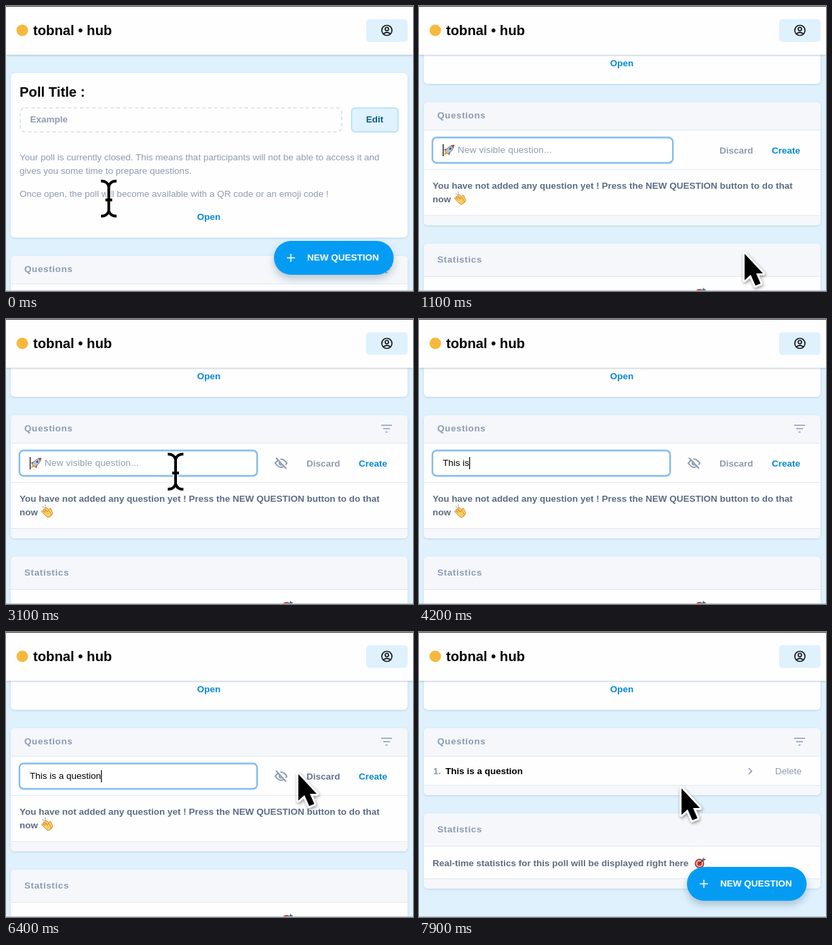
Recreate the animation shown at these times as an HTML page. Size 600x421 px, loop 8000 ms.

```html
<!DOCTYPE html>
<html lang="en">
<head>
<meta charset="utf-8">
<title>Poll editor</title>
<style>
  html, body { margin: 0; width: 100%; height: 100%; overflow: hidden; background: #dff1fd; }
  svg { display: block; width: 100%; height: 100%; }
  text { font: 13.5px "Liberation Sans", Arial, sans-serif; white-space: pre; fill: #8c9bb0; }
  .b { font-weight: bold; }
  .big { font-size: 20.25px; font-weight: bold; fill: #000; }
  .head { font-weight: bold; letter-spacing: .6px; }
  .slate { font-weight: bold; fill: #5d6c84; }
  .link { font-weight: bold; fill: #0788d1; }
  .dark { fill: #000; }
  .mid { text-anchor: middle; }
  .card { fill: #fefeff; filter: drop-shadow(0 1px 1.5px #7f9db055); }
  .band { fill: #f5f7fb; }
  .line { stroke: #e2e8f0; fill: none; }
  .icon { fill: none; stroke: #8c9bb0; stroke-width: 1.6; }
</style>
</head>
<body>
<svg viewBox="0 0 600 421">
  <defs>
    <clipPath id="qClip"><rect class="qSize" x="7" width="585" rx="6"/></clipPath>
    <clipPath id="sClip"><rect x="7" width="585" height="111" rx="6"/></clipPath>
    <path id="arrowPath" d="M0 0V39L9 31L16 47L23.500 44L17 29H27Z"/>
    <path id="beamPath" d="M-11.5-26Q-2-26 0-18Q2-26 11.5-26M0-18V18M-11.5 26Q-2 26 0 18Q2 26 11.5 26M-5 2H5"/>
  </defs>
  <rect width="600" height="421" fill="#dff1fd"/>

  <g id="page">
    <rect class="card" x="7" y="99" width="585" height="243" rx="6"/>
    <text class="big" x="20" y="134">Poll Title :</text>
    <rect x="21" y="150.5" width="474" height="35.5" rx="7" fill="none" stroke="#d8dde6" stroke-width="1.6" stroke-dasharray="5 4"/>
    <text class="b" x="35.5" y="172">Example</text>
    <rect x="509.5" y="150.5" width="68.5" height="35.5" rx="5" fill="#dff2fe" stroke="#a9ddfa" stroke-width="1.5"/>
    <text class="b mid" x="543.5" y="172" style="fill:#075985">Edit</text>
    <text x="20" y="228">Your poll is currently closed. This means that participants will not be able to access it and</text>
    <text x="20" y="248">gives you some time to prepare questions.</text>
    <text x="20" y="282">Once open, the poll will become available with a QR code or an emoji code !</text>
    <text class="link mid" x="299" y="315.5">Open</text>

    <g transform="translate(0 369)">
      <rect class="card qSize" x="7" width="585" rx="6"/>
      <g clip-path="url(#qClip)">
        <rect class="band" x="7" width="585" height="41"/>
        <path class="line" d="M7 41.5H592"/>
        <g id="foot">
          <rect class="band" x="7" width="585" height="15"/>
          <path class="line" d="M7 .5H592"/>
        </g>
      </g>
      <text class="head" x="27" y="24">Questions</text>
      <path id="filter" class="icon" d="M553 15H569M556 20H566M559.5 25H562.5"/>

      <g id="form">
        <path class="line" d="M7 99.5H592"/>
        <rect class="field" x="20" y="52.5" height="37" rx="6" fill="none" stroke="#c3e1fa" stroke-width="4"/>
        <rect class="field" x="20" y="52.5" height="37" rx="6" fill="#fff" stroke="#7db6e8" stroke-width="1.8"/>
        <g id="hint">
          <g transform="translate(44 71) rotate(45)">
            <path d="M-3-1L-6 5L-2 4ZM3-1L6 5L2 4Z" fill="#c73f37"/>
            <path d="M0-11Q5-5 3 5H-3Q-5-5 0-11Z" fill="#b9c6d2" stroke="#5d6b7a" stroke-width=".8"/>
            <path d="M0-11L2.5-7H-2.5Z" fill="#c73f37"/>
            <circle cy="-3" r="1.7" fill="#28618f"/>
            <path d="M-2 5H2L0 11Z" fill="#f5a524"/>
          </g>
          <text x="57" y="75" style="letter-spacing:.2px">New visible question...</text>
        </g>
        <text id="typed" class="dark" x="35" y="75"></text>
        <rect id="caret" y="62" width="1.2" height="18"/>
        <g id="eye" class="icon" style="stroke-width:2">
          <path d="M397 71Q405.5 59 414 71Q405.5 83 397 71Z"/>
          <circle cx="405.5" cy="71" r="2.5"/>
          <path d="M399 62L414 78" stroke="#fff" stroke-width="4"/>
          <path d="M398 63L413 79"/>
        </g>
        <text id="discard" class="b" x="443" y="75.5">Discard</text>
        <text class="link" x="520" y="75.5">Create</text>
      </g>

      <g id="empty">
        <text class="slate" x="20" y="69.500">You have not added any question yet ! Press the NEW QUESTION button to do that</text>
        <text class="slate" x="20" y="89.500">now</text>
        <g transform="translate(60.500 86) rotate(-40)" stroke="#c98a2c" stroke-width=".8" fill="#fbcd62">
          <path d="M-2-4Q-2-8 0-7L1-2L2-8Q4-9 4-6L5-1Q8-4 8-1L6 6Q2 9-2 6Z"/>
          <path d="M-5-2Q-6-7-4-7L-2-2L-2-7Q0-8 0-5L1 0Q4-3 4 0L3 6Q-1 9-4 6Z"/>
          <path d="M1-9V-11M4-9L6-11" fill="none" stroke="#8fa5ba" stroke-width="1.200"/>
        </g>
      </g>

      <g id="list">
        <text class="b" x="21" y="67.5">1.</text>
        <text class="b dark" x="39" y="67.5">This is a question</text>
        <path class="icon" d="M486 59L490.5 63.5L486 68"/>
        <text x="525" y="67.5">Delete</text>
      </g>
    </g>

    <g id="stats">
      <rect class="card" x="7" width="585" height="111" rx="6"/>
      <g clip-path="url(#sClip)">
        <rect class="band" x="7" width="585" height="48"/>
        <path class="line" d="M7 48.5H592"/>
        <rect class="band" x="7" y="97" width="585" height="15"/>
        <path class="line" d="M7 96.5H592"/>
      </g>
      <text class="head" x="27" y="28">Statistics</text>
      <text class="slate" x="20" y="77.5">Real-time statistics for this poll will be displayed right here</text>
      <g transform="translate(413.5 74)">
        <circle r="7" fill="#b93a35"/>
        <circle r="5" fill="#eed9d3"/>
        <circle r="3.500" fill="#b93a35"/>
        <path d="M0 0L6-6" stroke="#4a3030" stroke-width="1.2"/>
        <path d="M4-5L6-9L7-7L10-6L6-4Z" fill="#2f6f98"/>
      </g>
    </g>
  </g>

  <g>
    <rect width="600" height="72" fill="#fefeff" style="filter:drop-shadow(0 1px 1.5px #60788a66)"/>
    <rect width="600" height="1" fill="#3a3a3c"/>
    <circle cx="24" cy="36" r="8.5" fill="#f8b83c"/>
    <text class="big" x="40" y="43">tobnal • hub</text>
    <rect x="531" y="19.5" width="61" height="33.5" rx="5" fill="#dff1fd"/>
    <g fill="none" stroke="#16191d" stroke-width="1.7">
      <circle cx="561.5" cy="36" r="7.5"/>
      <circle cx="561.5" cy="34" r="2.5"/>
      <path d="M556 41.5Q561.5 36.5 567 41.5"/>
    </g>
  </g>
  <rect y="420" width="600" height="1" fill="#b5c2cb"/>

  <g id="fab">
    <rect id="pill" y="347" height="50" rx="25" fill="#049cf3" style="filter:drop-shadow(0 6px 6px #36587050)"/>
    <path id="plus" d="M414 372H426M420 366V378" stroke="#fff" stroke-width="1.5"/>
    <text class="b" x="444" y="376" style="fill:#fff">NEW QUESTION</text>
  </g>

  <g id="pointer">
    <g id="arrow" stroke-linejoin="round" style="filter:drop-shadow(1px 2px 2px #0006)">
      <use href="#arrowPath" fill="#fff" stroke="#fff" stroke-width="6"/>
      <use href="#arrowPath"/>
    </g>
    <g id="beam" fill="none">
      <use href="#beamPath" stroke="#fff" stroke-width="7"/>
      <use href="#beamPath" stroke="#000" stroke-width="4"/>
    </g>
  </g>
</svg>
<script>
  const LOOP = 8000, OPEN = 1000, TYPE = 3500, KEY = 95, CLOSE = 7150, ADDED = 7450;
  const SCROLL = 227, QUESTION = "This is a question";
  const TYPED = TYPE + KEY * QUESTION.length;
  // time, x, y
  const path = [
    [0, 151.5, 284.5], [150, 151.5, 284.5], [800, 480, 366], [1400, 480, 366],
    [2500, 250, 225.5], [5600, 250, 225.5], [6350, 431, 210], [6450, 431, 210],
    [6900, 540, 209], [7250, 540, 209], [7850, 387, 231], [LOOP, 387, 231]
  ];

  const $ = id => document.getElementById(id);
  const show = (id, on) => $(id).style.display = on ? "" : "none";
  const move = (id, x, y) => $(id).setAttribute("transform", `translate(${x} ${y})`);
  const size = (cls, name, value) =>
    document.querySelectorAll("." + cls).forEach(el => el.setAttribute(name, value));

  function pointerAt(t) {
    const i = path.findIndex(p => p[0] > t);
    const [t0, x0, y0] = path[i - 1], [t1, x1, y1] = path[i];
    const u = (t - t0) / (t1 - t0), e = u * u * (3 - 2 * u);
    return [x0 + (x1 - x0) * e, y0 + (y1 - y0) * e];
  }

  function drawCard(t, form) {
    const listed = t >= ADDED;
    const height = listed ? 99 : form ? 182 : 124;
    size("qSize", "height", height);
    move("foot", 0, height - 15);
    move("empty", 0, form ? 58 : 0);
    move("stats", 0, 369 + height + 27);
    show("form", form);
    show("empty", !listed);
    show("list", listed);
  }

  function drawField(t) {
    const icons = t >= OPEN + 200;
    show("eye", icons);
    show("filter", t < OPEN || icons);
    size("field", "width", icons ? 350 : 354);

    const count = Math.max(0, Math.min(QUESTION.length, Math.floor((t - TYPE) / KEY)));
    $("typed").textContent = QUESTION.slice(0, count);
    show("hint", !count);
    const typing = t >= TYPE && t < TYPED;
    const since = t - (t < TYPE ? OPEN : TYPED);
    show("caret", typing || since % 1000 < 500);
    $("caret").setAttribute("x", 35 + (count ? $("typed").getComputedTextLength() : 0));
  }

  function draw(t) {
    const form = t >= OPEN && t < CLOSE;
    move("page", 0, t < OPEN ? 0 : -SCROLL);
    drawCard(t, form);
    drawField(t);

    const plus = t < OPEN || t >= CLOSE + 150, left = plus ? 395 : 415;
    show("fab", !form);
    show("plus", plus);
    $("pill").setAttribute("x", left);
    $("pill").setAttribute("width", 571.5 - left);

    const [x, y] = pointerAt(t);
    const beam = t < 350 || form && x < 372 && y < 240;
    move("pointer", x, y);
    show("pointer", t < TYPE || t >= 5600);
    show("beam", beam);
    show("arrow", !beam);
    const hover = form && x > 425 && x < 508 && y < 235;
    $("discard").style.fill = hover ? "#64748b" : "";
  }

  function tick() {
    draw(performance.now() % LOOP);
    requestAnimationFrame(tick);
  }
  tick();
</script>
</body>
</html>
```
